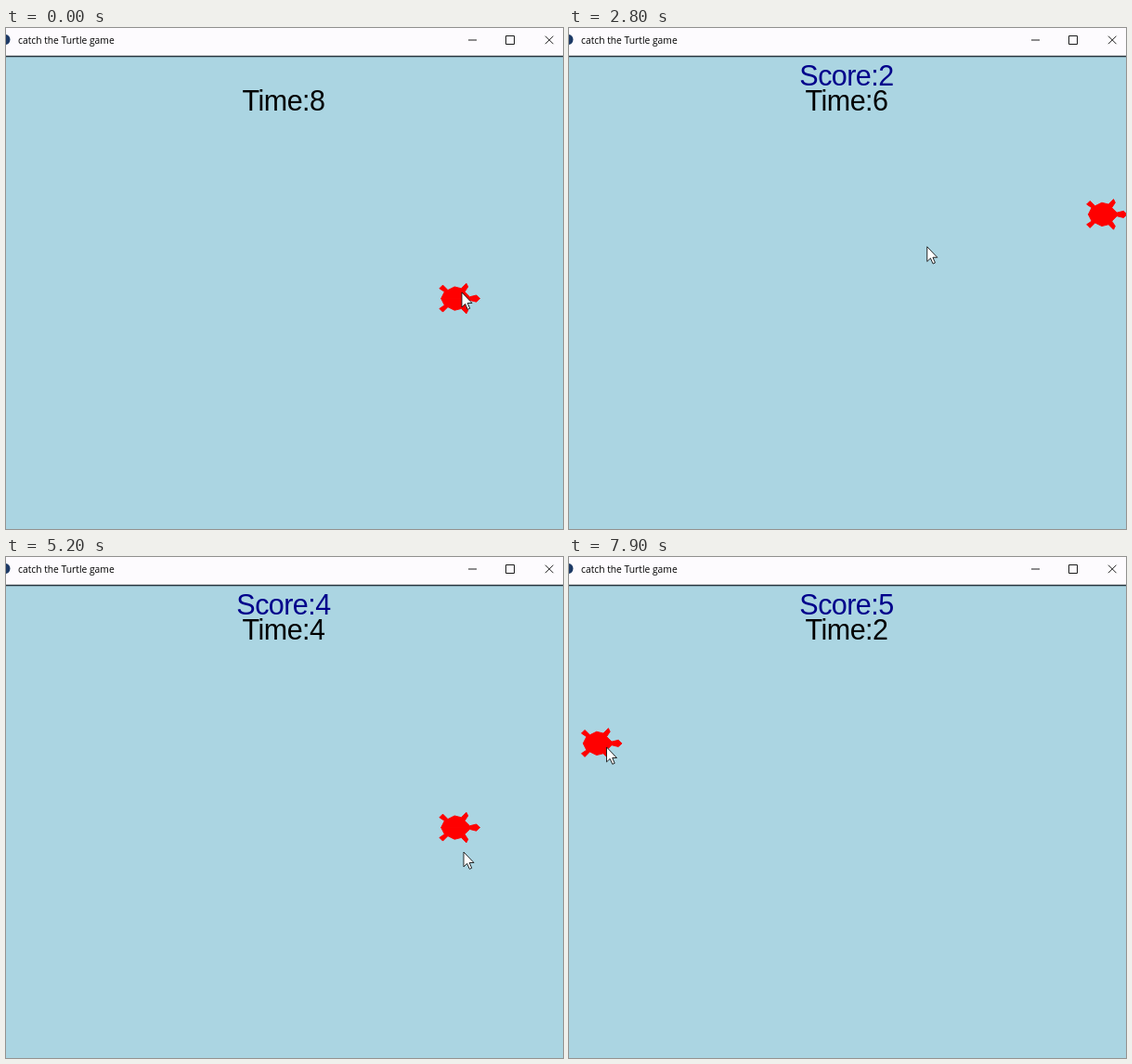
An HTML page for the animation above (8 s loop, 600 by 540 pixels).

```html
<!DOCTYPE html>
<html lang="en">
<head>
<meta charset="utf-8">
<title>catch the Turtle game</title>
<style>
  html, body { margin: 0; width: 100%; height: 100%; overflow: hidden; background: #abd5e2; }
  svg { display: block; width: 100%; height: 100%; }
  .title { font: 10.3px "Open Sans", "Noto Sans", sans-serif; fill: #000; }
  .label { font: 30.5px "Liberation Sans", Arial, sans-serif; letter-spacing: -.55px; text-anchor: middle; }
  .buttons { fill: none; stroke: #1c1c1c; }
</style>
</head>
<body>
<svg viewBox="0 0 600 540">
  <rect width="600" height="540" fill="#abd5e2"/>
  <rect width="600" height="30" fill="#fdfbfe"/>
  <rect y="29.8" width="600" height="1.5" fill="#27343c"/>
  <circle cx="-1" cy="12.5" r="5.5" fill="#1d3a66"/>
  <text class="title" x="13" y="17">catch the Turtle game</text>
  <path class="buttons" d="M498 13h9M538.5 8.5h9v9h-9zM581 8.7l8.5 8.5M589.5 8.7l-8.5 8.5"/>
  <text class="label" id="score" x="299" y="62.4" fill="#00008b"></text>
  <text class="label" id="time" x="299" y="89"></text>
  <g id="turtle" fill="red" stroke="red" stroke-width=".5">
    <path id="half" d="M16 0L14 2L10 1L7 4L9 7L8 9L5 6L1 7L-3 5L-6 8L-8 6L-5 4L-7 0Z"/>
    <use href="#half" transform="scale(1 -1)"/>
  </g>
  <path id="cursor" d="M.5 .5V16.4L4.2 12.9L6.8 18.8L9.2 17.8L6.7 12H11.5Z" fill="#fff" stroke="#111" stroke-width=".9"/>
</svg>
<script>
const LOOP = 8000, STEP = 100;
const FIRST = 500, TICK = 1300;           // countdown
const HOP = 1600, GLIDE = 0.5;            // turtle: ms between hops, ms per pixel while hidden
const CELL = 90.7, SCALE = 1.81, DWELL = 200;
const el = id => document.getElementById(id);

const cell = (col, row) => ({ x: 300 + col * CELL, y: 382.3 - row * CELL });
const homes = [cell(2, 1), cell(0, 0), cell(3, 2), cell(2, 1), cell(3, 2), cell(-3, 2)];

// Pointer key points; it rests a moment wherever it clicks
const stops = [
  { at: 0, x: 490.5, y: 284.5, click: true },
  { at: 1000, x: 447, y: 297 },
  { at: 1500, x: 301, y: 383, click: true },
  { at: 2200, x: 213, y: 270 },
  { at: 3400, x: 557.5, y: 200.5, click: true },
  { at: 4600, x: 487, y: 290, click: true },
  { at: 5200, x: 492.5, y: 317.5 },
  { at: 6000, x: 553.5, y: 205.5, click: true },
  { at: 7200, x: 391, y: 246 },
  { at: 7900, x: 40, y: 204.5, click: true }
];

const ease = k => k * k * (3 - 2 * k);
const clamp = k => Math.min(1, Math.max(0, k));

function pointerAt(t) {
  const i = stops.filter(stop => stop.at <= t).length - 1;
  const from = stops[i], to = stops[i + 1] || from;
  const leave = from.at + (from.click ? DWELL : 0);
  const k = to === from ? 0 : ease(clamp((t - leave) / (to.at - leave)));
  return { x: from.x + (to.x - from.x) * k, y: from.y + (to.y - from.y) * k };
}

// The turtle hides while it travels, so longer hops keep it away longer
function turtleAt(t) {
  const hop = Math.floor((t - FIRST) / HOP) + 1;
  const home = homes[hop];
  if (hop === 0) return home;
  const last = homes[hop - 1];
  const travel = Math.hypot(home.x - last.x, home.y - last.y) * GLIDE;
  return t - FIRST - (hop - 1) * HOP >= travel ? home : null;
}

const place = (node, { x, y }, scale = 1) =>
  node.setAttribute('transform', `translate(${x} ${y}) scale(${scale})`);

function render(t) {
  const score = stops.filter(stop => stop.click && t > stop.at).length;
  const ticks = Math.floor((t - FIRST) / TICK) + 1;
  el('score').textContent = score ? 'Score:' + score : '';
  el('time').textContent = 'Time:' + (8 - ticks);

  const home = turtleAt(t);
  el('turtle').style.display = home ? '' : 'none';
  if (home) place(el('turtle'), home, SCALE);
  place(el('cursor'), pointerAt(t));
}

const start = performance.now();
function frame() {
  const t = (performance.now() - start) % LOOP;
  render(Math.floor(t / STEP) * STEP);
  requestAnimationFrame(frame);
}
frame();
</script>
</body>
</html>
```
